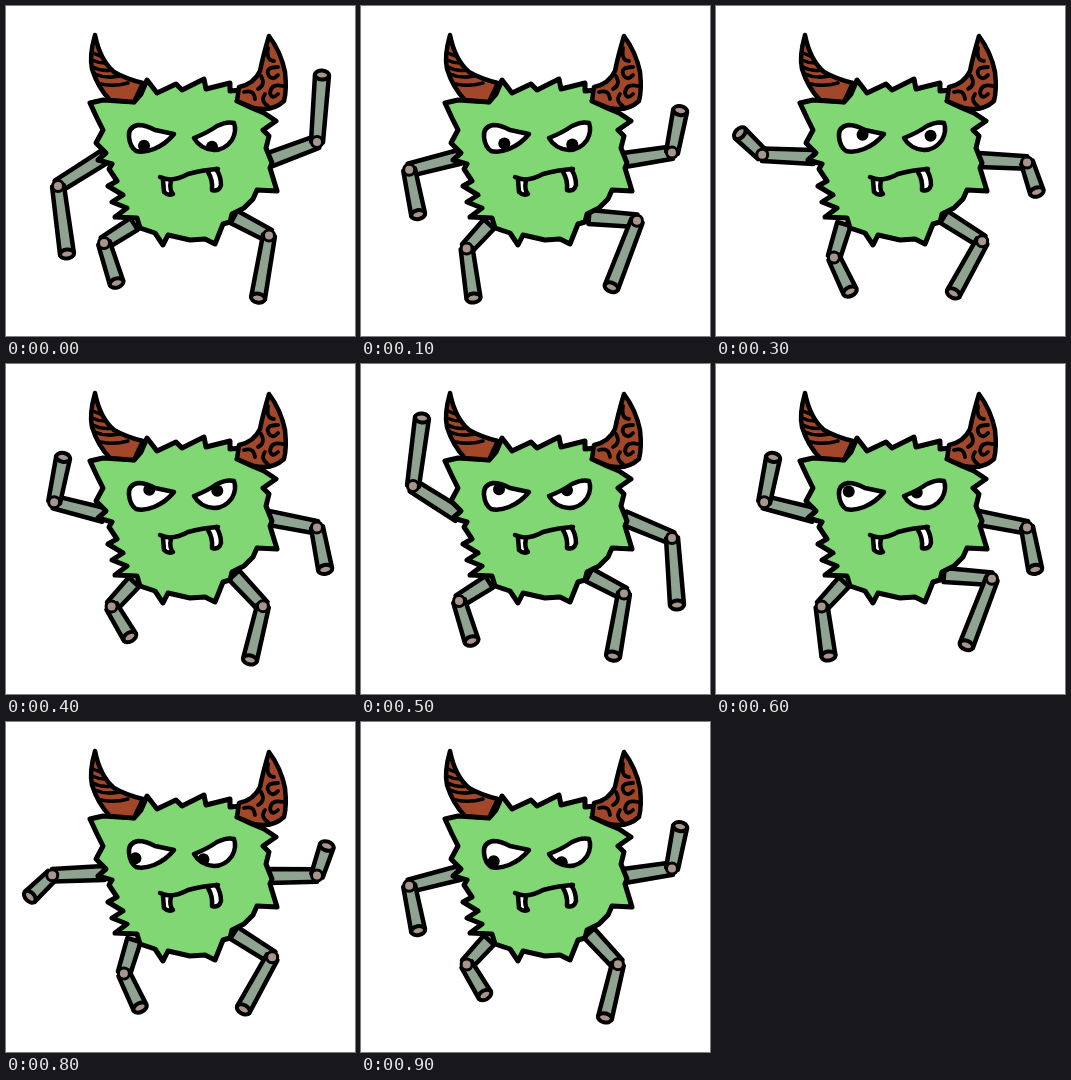
These frames come from a looping animation (349 by 330 pixels, 1000 ms). An HTML page with a canvas:

```html
<!DOCTYPE html>
<html lang="en">
<head>
<meta charset="utf-8">
<title>Dancing monster</title>
<style>
html, body { margin: 0; width: 100%; height: 100%; overflow: hidden; background: #fff; }
canvas { display: block; width: 349px; height: 330px; }
</style>
</head>
<body>
<canvas id="stage" width="349" height="330"></canvas>
<script>
const ctx = document.getElementById('stage').getContext('2d');
const STEP = 100, STEPS = 10, TAU = Math.PI * 2;
const GREEN = '#80d773', HORN = '#a3472a', LIMB = '#8fa391', SKIN = '#a8958c';

const body = new Path2D(`M84 97 L97 94 L128 96 L135 88 L141 74 L151 87 L170 78 L176 84
  L198 73 L200 83 L224 77 L224 85 L236 84 L231 95 L246 102 L258 107 L270 115 L257 124
  L263 130 L260 142 L266 157 L264 162 L271 185 L251 184 L247 193 L238 202
  L226 208 L224 216 L217 218 L209 238 L199 233 L184 234 L162 229
  L157 239 L149 227 L134 222 L131 212 L109 211 L121 202 L106 196 L117 189
  L102 180 L111 175 L103 163 L106 158 L92 154 L100 147 L90 137 L97 124 L91 112Z`);

const leftHorn = new Path2D('M89 29 Q83 50 86 63 Q92 82 104 94 L128 96 L137 77 Q120 73 108 66 Q94 54 89 29Z');
const leftMarks = new Path2D(`M87 47 L94 50 M86 54 Q92 57 99 57
  M87 61 Q96 66 106 64 M89 68 Q100 73 114 70 M95 78 Q108 81 122 77`);
const rightHorn = new Path2D('M263 30 Q275 46 279 66 Q281 84 278 95 Q266 106 248 102 L231 95 L233 81 Q248 78 254 65 Q257 50 263 30Z');
const rightMarks = new Path2D(`M262 42 Q260 55 268 55 M272 61 Q258 61 263 70
  Q267 75 272 69 M255 70 Q260 79 252 83 M277 80 Q265 77 264 87 Q266 94 272 88
  M238 86 Q248 83 249 93 M259 88 Q254 95 262 100`);

const leftEye = new Path2D('M123 131 Q122 121 132 119 Q140 119 149 124 L168 128 Q160 138 148 143 Q138 147 130 145 Q124 141 123 131Z');
const rightEye = new Path2D('M188 132 Q201 127 211 120 Q221 115 228 117 Q231 125 226 134 Q219 144 208 144 Q194 143 188 132Z');

const leftFang = new Path2D('M157 174 L158 186 Q162 190 167 188 Q163 184 165 174');
const rightFang = new Path2D('M202 166 Q207 174 206 184 Q213 186 215 179 Q215 170 210 163');
const smile = new Path2D('M154 171 Q166 177 182 168 Q196 164 212 163');

function ink(path, fill, width = 4.5) {
  ctx.lineWidth = width;
  if (fill) {
    ctx.fillStyle = fill;
    ctx.fill(path);
  }
  ctx.stroke(path);
}

function oval(x, y, rx, ry = rx, turn = 0) {
  const p = new Path2D();
  p.ellipse(x, y, rx, ry, turn, 0, TAU);
  return p;
}

function bone(x1, y1, x2, y2, w1, w2) {
  const turn = Math.atan2(y2 - y1, x2 - x1);
  const nx = -Math.sin(turn) / 2, ny = Math.cos(turn) / 2;
  const p = new Path2D();
  p.moveTo(x1 + nx * w1, y1 + ny * w1);
  p.lineTo(x2 + nx * w2, y2 + ny * w2);
  p.lineTo(x2 - nx * w2, y2 - ny * w2);
  p.lineTo(x1 - nx * w1, y1 - ny * w1);
  p.closePath();
  ink(p, LIMB);
  return turn;
}

// root, joint, then the end relative to the joint
function limb(sx, sy, jx, jy, dx, dy) {
  const ex = jx + dx, ey = jy + dy;
  bone(sx, sy, jx, jy, 14, 12.5);
  const turn = bone(jx, jy, ex, ey, 12, 14);
  ink(oval(ex, ey, 4.5, 7, turn), SKIN, 4);
  ink(oval(jx, jy, 5.5), SKIN, 3);
}

// u runs from -1 (left arm down, right arm up) to 1 and back
function arms(step) {
  const u = 1 - Math.abs(step - 5) / 2.5;
  const side = Math.sign(u), reach = Math.abs(u);
  const swing = side * reach ** 1.6;
  const flick = 35 * Math.exp(-((u / 0.35) ** 4));
  limb(98, 151, 46 + 6 * u * u, 151 - 29 * swing, 9 - flick, -side * (10 + 58 * reach));
  limb(263, 154, 311, 155 + 19 * swing, 10 - 5 * u * u, side * (28 + 39 * u * u));
}

// the legs make two rounds per loop
function legs(step) {
  const c = Math.cos(step / 5 * TAU), s = Math.sin(step / 5 * TAU);
  limb(128, 218, 109 - 11 * c, 245 - 8 * c, 12.6 - 6 * s, 40 + 10 * s);
  limb(228, 211, 268 - 5 * c + 10 * s, 228 + 1.5 * c - 14.4 * s,
    -23 + 12 * c - 6.6 * s, 59 + 3.6 * c + 6.7 * s);
}

function eye(shape, x, y) {
  ink(shape, '#fff');
  ctx.save();
  ctx.clip(shape);
  ctx.fillStyle = '#000';
  ctx.fill(oval(x, y, 6));
  ctx.restore();
}

function eyes(step) {
  const a = step / STEPS * TAU;
  const dx = 9 * Math.sin(a), dy = 7.5 * Math.cos(a + 0.2);
  eye(leftEye, 138 + dx, 132.5 + dy);
  eye(rightEye, 206 + dx, 133.5 + dy);
}

function draw(step) {
  ctx.fillStyle = '#fff';
  ctx.fillRect(0, 0, 349, 330);
  ctx.strokeStyle = '#000';
  ctx.lineJoin = ctx.lineCap = 'round';

  arms(step);
  legs(step);
  ink(body, GREEN, 5);
  ink(leftHorn, HORN);
  ink(leftMarks, null, 3.5);
  ink(rightHorn, HORN);
  ink(rightMarks, null, 3.8);
  eyes(step);
  ink(leftFang, '#fff');
  ink(rightFang, '#fff');
  ink(smile);
}

const start = performance.now();
let shown = -1;
function tick(now) {
  const step = Math.floor(Math.max(0, now - start) / STEP) % STEPS;
  if (step !== shown) draw(shown = step);
  requestAnimationFrame(tick);
}
tick(start);
</script>
</body>
</html>
```
